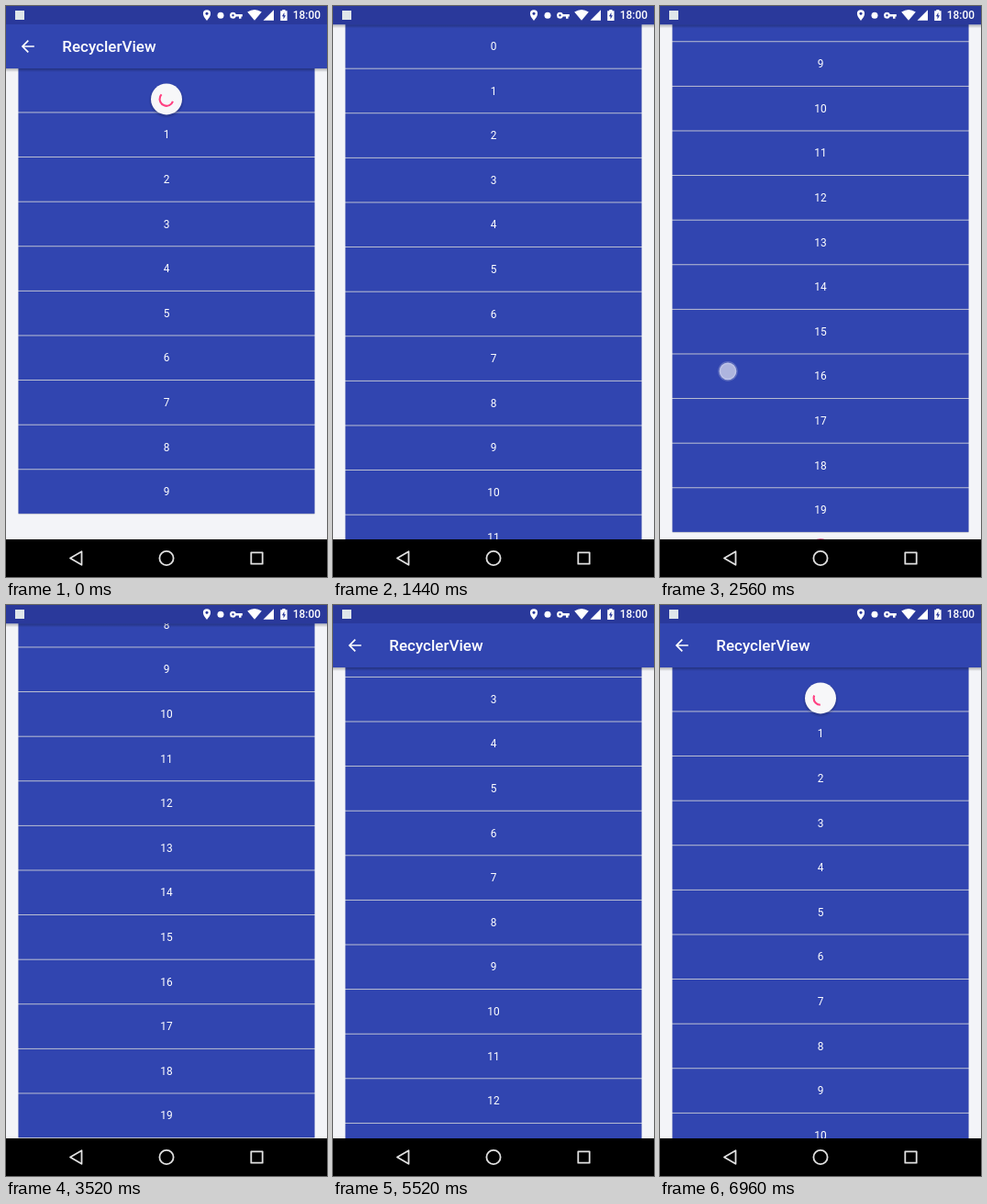
Animation of 350 by 622 pixels, one loop 7040 ms. Source, as an HTML page:

```html
<!DOCTYPE html>
<html lang="en">
<head>
<meta charset="utf-8">
<title>RecyclerView</title>
<style>
  html, body { margin: 0; width: 100%; height: 100%; overflow: hidden; background: #f3f4f8; }
  svg { display: block; width: 350px; height: 622px; font-family: Roboto, "Open Sans", sans-serif; }
  text { fill: #fff; }
  #rows text { font-size: 11.9px; text-anchor: middle; }
  #rows rect { fill: #3145b0; }
  #rows .line { fill: #cbcdd5; }
  .arc { fill: none; stroke: #ff4081; }
</style>
</head>
<body>
<svg viewBox="0 0 350 622">
  <defs>
    <linearGradient id="shade" x2="0" y2="1">
      <stop offset="0" stop-color="#000" stop-opacity=".28"/>
      <stop offset="1" stop-color="#000" stop-opacity="0"/>
    </linearGradient>
    <radialGradient id="halo">
      <stop offset=".8" stop-color="#000" stop-opacity=".22"/>
      <stop offset="1" stop-color="#000" stop-opacity="0"/>
    </radialGradient>
  </defs>

  <g id="list">
    <g id="rows"></g>
    <g id="footer"><circle class="arc" r="16" stroke-width="3.4" pathLength="360"/></g>
  </g>
  <path id="glow" d="M13.500 0V-38Q175-92 336.500-38V0z" fill="#3145b0"/>

  <g id="refresh">
    <circle cy="1.5" r="19.5" fill="url(#halo)"/>
    <circle r="17" fill="#f7f7f9"/>
    <circle class="arc" r="7.4" stroke-width="2.1" pathLength="360"/>
  </g>

  <g id="bar">
    <rect y="68" width="350" height="4" fill="url(#shade)"/>
    <rect y="20" width="350" height="48" fill="#3145b0"/>
    <path d="M30.800 44H18.500M24.300 37.700L18 44L24.300 50.300" fill="none" stroke="#fff" stroke-width="1.7"/>
    <text x="61.3" y="50.1" font-size="17" font-weight="500">RecyclerView</text>
  </g>

  <rect width="350" height="20" fill="#2a399b"/>
  <g fill="#fff">
    <rect x="10" y="5" width="10" height="10" fill="#dfe6ea"/>
    <path fill-rule="evenodd" d="M219 16C216.500 13 214.900 10.700 214.900 8.300A4.100 4.100 0 0 1 223.100 8.300C223.100 10.700 221.500 13 219 16zM219 6.700a1.600 1.600 0 1 0 .01 0z"/>
    <circle cx="234" cy="10.2" r="3.5"/>
    <path fill-rule="evenodd" d="M247.500 6.700A3.500 3.500 0 0 1 250.800 9H257.800V11.500H256.500V13.700H254V11.500H250.800A3.500 3.500 0 1 1 247.500 6.700zM247.500 9a1.200 1.200 0 1 0 .01 0z"/>
    <path d="M271 15.800L263.200 6.600Q271 1.600 278.800 6.600z"/>
    <path d="M280.500 15.700H292V4.200z"/>
    <path fill-rule="evenodd" d="M299.200 5.300H301.300V4H304.500V5.300H306.600V16H299.200zM303.400 7L300.900 11.300H302.500V14.500L305 10.200H303.400z"/>
    <text x="312.8" y="14.3" font-size="11.9" font-weight="500">18:00</text>
  </g>

  <rect y="581" width="350" height="41" fill="#000"/>
  <g fill="none" stroke="#e0e0e0" stroke-width="1.8" stroke-linejoin="round">
    <path d="M82.500 594.300V608.800L70 601.500z"/>
    <circle cx="175" cy="601.5" r="7.6"/>
    <rect x="267.3" y="595.3" width="12.4" height="12.4"/>
  </g>

  <g id="touch">
    <circle r="10.8" fill="#7c87c8" opacity=".6"/>
    <circle r="8.6" fill="#aeb5de" stroke="#bfc5e8" stroke-width="1.5"/>
  </g>
</svg>
<script>
const LOOP = 7040, STEP = 80;
const PITCH = 48.6, BAR = 47.8, TOP = 67.8, BOTTOM = 581;
const PAGE = 10, LOAD_1 = 1280, LOAD_2 = 3200;

const $ = id => document.getElementById(id);
const show = (el, on) => el.setAttribute('visibility', on ? 'visible' : 'hidden');
const move = (el, value) => el.setAttribute('transform', value);

const clamp = u => Math.max(0, Math.min(1, u));
const ramp = (t, from, to) => clamp((t - from) / (to - from));
const smooth = (t, from, to) => {
  const u = ramp(t, from, to);
  return u * u * (3 - 2 * u);
};
const pulse = (t, from, peak, to) => Math.min(ramp(t, from, peak), 1 - ramp(t, peak, to));

// Scroll offset at which the given number of rows ends at the bottom edge.
const endOf = count => count * PITCH - (BOTTOM - TOP + BAR);

// Each drag: start and end time, start and end height of the finger.
const drags = [
  [560, 960, 440, 385], [1760, 1920, 440, 320], [2480, 3040, 407.5, 340],
  [4320, 4480, 420, 300], [5040, 5200, 250, 410], [5760, 6480, 200, 413]
];

const rows = Array.from({ length: 3 * PAGE }, (_, i) => {
  const y = i * PITCH;
  $('rows').insertAdjacentHTML('beforeend',
    `<g><rect class="line" x="13.5" y="${y}" width="323" height="48.8"/>
     <rect x="13.5" y="${y}" width="323" height="47.7"/>
     <text x="175" y="${y + 28}">${i}</text></g>`);
  return $('rows').lastChild;
});

function setArc(group, start, sweep) {
  const arc = group.querySelector('.arc');
  arc.setAttribute('stroke-dasharray', `${sweep} 360`);
  move(arc, `rotate(${start % 360})`);
}

function drawList(t) {
  const shift = BAR * (smooth(t, 480, 960) - smooth(t, 5000, 5200));
  const scroll = endOf(2 * PAGE) * smooth(t, 1680, 2400)
    + PITCH * (smooth(t, 2480, 2810) - smooth(t, LOAD_2, 3480))
    + PAGE * PITCH * smooth(t, 4240, 4800)
    - endOf(3 * PAGE) * smooth(t, 5100, 5656);
  move($('bar'), `translate(0 ${-shift})`);
  move($('list'), `translate(0 ${TOP - shift - scroll})`);

  rows.forEach((row, i) => {
    const loaded = i < PAGE ? -STEP * 2 : i < 2 * PAGE ? LOAD_1 : LOAD_2;
    row.setAttribute('opacity', ramp(t, loaded, loaded + STEP * 2));
  });

  const first = t < LOAD_1 + STEP;
  show($('footer'), first ? t >= 720 : t >= 2400 && t < LOAD_2 + STEP);
  move($('footer'), `translate(175 ${((first ? 1 : 2) * PAGE + .5) * PITCH})`);
  setArc($('footer'), t * .5, 150 + 110 * Math.sin(t / 210));
}

function drawGlow(t) {
  const atEnd = t < 5200;
  const size = .78 * (atEnd ? pulse(t, 4720, 4800, 5040) : pulse(t, 5600, 5680, 6080));
  show($('glow'), size > 0);
  move($('glow'), `translate(0 ${atEnd ? BOTTOM : TOP}) scale(1 ${atEnd ? size : -size})`);
  $('glow').setAttribute('opacity', size * .64);
}

function drawRefresh(t) {
  // The pull starts late in the loop and its spinner closes in the next one.
  const age = (t + 1200) % LOOP, closing = t < 320;
  const y = 46 + 76 * ramp(age, 0, 560) - 20.6 * smooth(age, 640, 800);
  show($('refresh'), age < 1520);
  move($('refresh'), `translate(175 ${y}) scale(${1 - smooth(age, 1200, 1520)})`);
  setArc($('refresh'), t * .36 + (closing ? 20 : 106),
    (160 + 90 * Math.sin(t / 190 + .5)) * ramp(age, 0, 560));
}

function drawTouch(t) {
  const drag = drags.find(([from, to]) => t >= from && t <= to);
  show($('touch'), drag);
  if (!drag) return;
  const [from, to, y0, y1] = drag;
  move($('touch'), `translate(74 ${y0 + (y1 - y0) * ramp(t, from, to)})`);
}

function tick() {
  // The picture advances in steps of 80 ms.
  const t = Math.floor(performance.now() % LOOP / STEP) * STEP;
  drawList(t);
  drawGlow(t);
  drawRefresh(t);
  drawTouch(t);
  requestAnimationFrame(tick);
}
tick();
</script>
</body>
</html>
```
